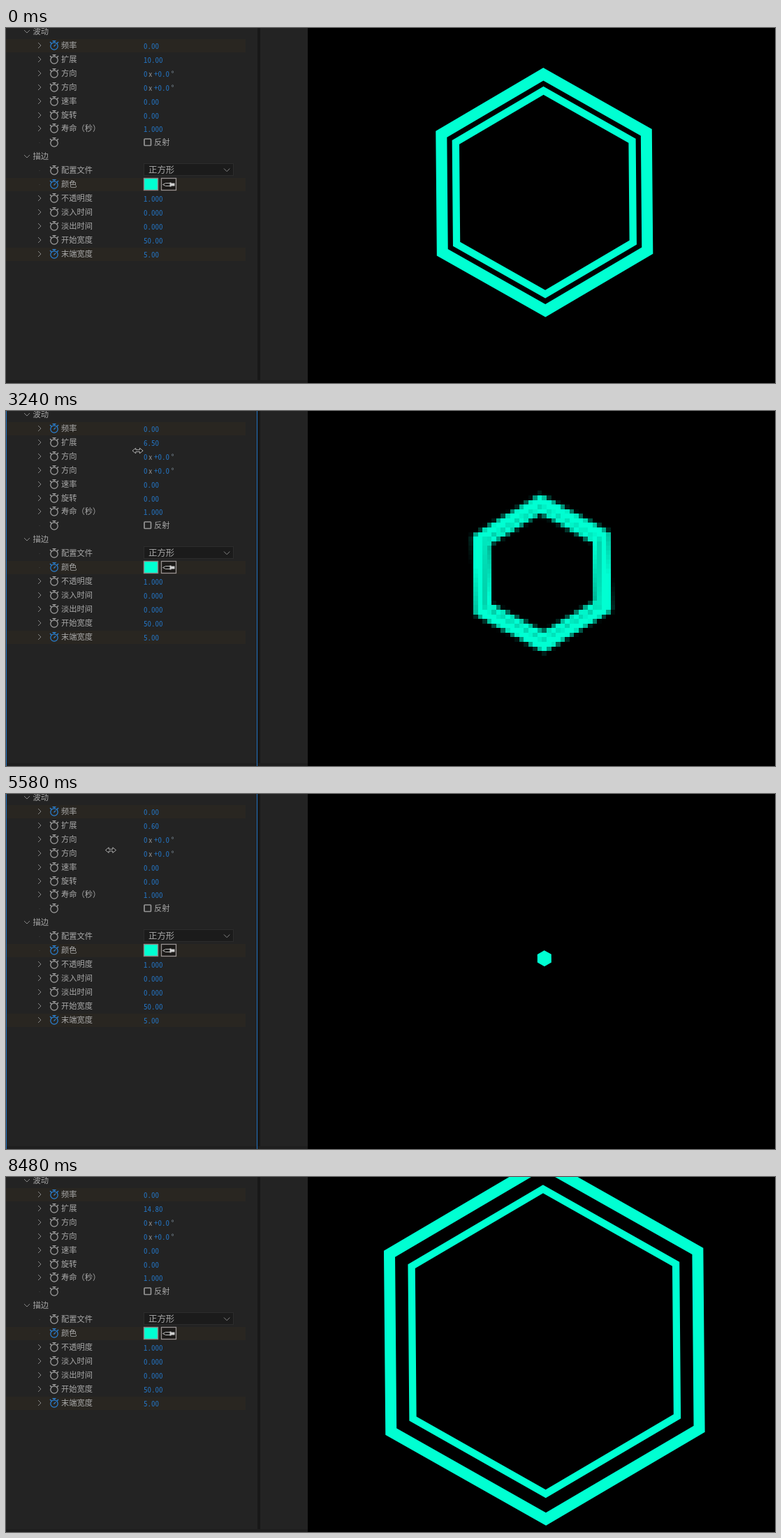
Animation, 1101 px wide and 509 px high, one loop 8510 ms. Source, as an HTML page with a canvas:

```html
<!DOCTYPE html>
<html lang="zh">
<head>
<meta charset="utf-8">
<style>
html, body { margin: 0; width: 100%; height: 100%; overflow: hidden; background: #232323; }
canvas, svg { position: absolute; left: 0; top: 0; width: 1101px; height: 509px; }
text { font: 300 11.25px "Noto Sans CJK SC", "Noto Sans CJK", "Noto Sans CJK JP", sans-serif; fill: #a8a8a8; }
text.num { font: 11px "Noto Sans Mono CJK SC", "Noto Sans Mono CJK JP", "Liberation Mono", monospace; fill: #2475c4; white-space: pre; }
.line { fill: none; stroke: #858585; stroke-width: 1; }
.watch { fill: none; stroke: #a6a6a6; stroke-width: 1.200; }
.watch.on { stroke: #2a84da; }
</style>
</head>
<body>
<canvas id="view" width="1101" height="509"></canvas>
<svg viewBox="0 0 1101 509">
  <rect width="360" height="509" fill="#232323"/>
  <rect x="360" width="4" height="509" fill="#181818"/>
  <rect x="364" width="68" height="509" fill="#232323"/>
  <rect y="505" width="432" height="4" fill="#1e1e1e"/>
  <g id="panel"></g>
  <path id="focus" d="M.5 0V509M359.500 0V509" stroke="#2272c0" fill="none"/>
  <path id="arrow" d="M0 0V16L3.700 12.600L6.200 18.300L8.700 17.200L6.200 11.700H11.300Z" fill="#fff" stroke="#000" stroke-width=".8"/>
  <g id="hand">
    <path d="M-1.500 0Q0 -1.500 1.500 0V6L7 7.500Q8.500 8 8 11L6.500 17H-2.500L-6.500 10.500Q-5.500 8 -1.500 11Z" fill="#fff" stroke="#000" stroke-width=".9"/>
    <path d="M-5 2L-9 5L-5 8M5 1L9 4L6.500 6" fill="none" stroke="#ddd"/>
  </g>
  <path id="drag" d="M-7.500 0L-2.800 -3.800V-1.300H2.800V-3.800L7.500 0L2.800 3.800V1.300H-2.800V3.800Z" fill="#161616" stroke="#c4c4c4" stroke-width=".9"/>
</svg>
<script>
const LOOP = 8510, TEAL = '#00ffd2';
const $ = id => document.getElementById(id);

// Panel rows: label, value, kind
const rows = [
  ['波动', '', 'group'], ['频率', '0.00', 'keyed'], ['扩展', '10.00', 'live'],
  ['方向', 'angle'], ['方向', 'angle'], ['速率', '0.00'], ['旋转', '0.00'],
  ['寿命（秒）', '1.000'], ['', '', 'check'], ['描边', '', 'group'],
  ['配置文件', '', 'menu'], ['颜色', '', 'color'], ['不透明度', '1.000'],
  ['淡入时间', '0.000'], ['淡出时间', '0.000'], ['开始宽度', '50.00'], ['末端宽度', '5.00', 'keyed']
];

const label = (x, y, s, extra = '') => `<text x="${x}" y="${y}" ${extra}>${s}</text>`;
const num = (x, y, s, extra = '') => label(x, y, s, 'class="num" ' + extra);
const line = d => `<path class="line" d="${d}"/>`;

function stopwatch(y, on) {
  return `<path class="watch ${on ? 'on' : ''}" d="M74.200 ${y + 1}a5.200 5.200 0 1 1 -10.400 0a5.200 5.200 0 1 1 10.400 0` +
    `M66.500 ${y - 6.3}h5M69 ${y - 6}v2M63 ${y - 5}l2 2M75 ${y - 5}l-2 2${on ? `M68.500 ${y + 1.5}l2.700 -2.800` : ''}"/>`;
}

function control(kind, value, y) {
  if (kind === 'check')
    return `<rect x="198" y="${y - 5}" width="9.500" height="9.500" rx="1" fill="none" stroke="#959595" stroke-width="1.700"/>` + label(212, y + 4, '反射');
  if (kind === 'menu')
    return `<rect x="197.500" y="${y - 9.5}" width="128" height="17" fill="#1b1b1b" stroke="#2c2c2c"/>` +
      label(204, y + 4, '正方形', 'style="font-size:12.400px"') + line(`M312 ${y - 2.5}l4.200 4.200l4.200 -4.200`);
  if (kind === 'color')
    return `<rect x="197.500" y="${y - 8.5}" width="20" height="17" fill="${TEAL}" stroke="#908585" stroke-width="1.400"/>` +
      `<rect x="222.500" y="${y - 8.5}" width="21" height="17" fill="#1c1a18" stroke="#989292" stroke-width="1.300"/>` +
      `<path d="M224.500 ${y + .5}l4 -2h7v4h-7z" fill="none" stroke="#b8b8b8"/>` +
      `<path d="M234.500 ${y - 2.5}h2v1h5v4h-5v1h-2z" fill="#d0d0d0"/>`;
  if (value === 'angle')
    return num(197, y + 4.5, '0') + num(204, y + 4.5, 'x', 'style="fill:#8c8c8c"') + num(212, y + 4.5, '+0.0') + num(236.5, y + 4.5, '°', 'style="fill:#8494a2"');
  return value ? num(197, y + 4.5, value, kind === 'live' ? 'id="value"' : '') : '';
}

$('panel').innerHTML = rows.map(([name, value, kind], i) => {
  const y = Math.round(5 + 19.92 * i);
  if (kind === 'group')
    return line(`M26 ${y - 2}l4 4l4 -4`) + label(38.5, y + 4, name);
  const on = kind === 'keyed' || kind === 'color';
  const leaf = kind === 'check' || kind === 'menu' || kind === 'color';
  return (on ? `<rect y="${y - 9}" width="343" height="19" fill="#292621"/>` : '') +
    (leaf ? `<rect x="47.500" y="${y}" width="1" height="1" fill="#444"/>` : line(`M46 ${y - 4}l4 4l-4 4`)) +
    stopwatch(y, on) + label(79, y + 4, name) + control(kind, value, y);
}).join('');

// Drag path: time, cursor x, cursor y, value
const keys = [
  [1100, 210, 48, 10], [1140, 209, 48, 9.9], [1500, 183, 47, 7.5], [1930, 139, 45.5, 3.5],
  [2150, 126.5, 45, 2.3], [2400, 113, 46, 0.9], [2830, 140, 51, 2.6], [3240, 188.5, 57, 6.5],
  [3670, 228, 62, 10.2], [4120, 267, 66, 13.6], [4260, 280, 67, 14.7], [4450, 280, 67, 14.7],
  [5250, 163, 78, 2.7], [5450, 152, 80, 0.8], [5560, 150, 80.5, 0.6], [5730, 150, 80.5, 0.6],
  [6120, 203, 80, 5.6], [6530, 260, 79, 10.73], [6550, 263, 78.5, 11.2], [6850, 286, 79, 13.6],
  [7220, 297, 80, 14.8], [8510, 297, 80, 14.8]
];

const slope = (a, b, k) => (b[k] - a[k]) / (b[0] - a[0]);
function tangent(i, k) {
  if (!i || i === keys.length - 1) return 0;
  const a = slope(keys[i - 1], keys[i], k), b = slope(keys[i], keys[i + 1], k);
  return a * b <= 0 ? 0 : 2 * a * b / (a + b);
}
function track(t, k) {
  if (t <= keys[0][0]) return keys[0][k];
  let i = 0;
  while (i < keys.length - 2 && t > keys[i + 1][0]) i++;
  const a = keys[i], b = keys[i + 1], d = b[0] - a[0], u = Math.min(1, (t - a[0]) / d);
  const s = u * u * (3 - 2 * u);
  return a[k] + (b[k] - a[k]) * s + d * u * (1 - u) * ((1 - u) * tangent(i, k) - u * tangent(i + 1, k));
}

const ctx = $('view').getContext('2d');
const low = document.createElement('canvas'), lctx = low.getContext('2d');

function hexagon(c, half, tilt) {
  const r = half / Math.cos(Math.PI / 6);
  for (let i = 0; i < 6; i++) {
    const a = (i * 60 - 90 + tilt) * Math.PI / 180;
    c[i ? 'lineTo' : 'moveTo'](770.8 + r * Math.cos(a), 235.7 + r * Math.sin(a));
  }
  c.closePath();
}
function ring(c, half, width, tilt) {
  c.beginPath();
  hexagon(c, half, tilt);
  if (half > width) hexagon(c, half - width, tilt);
  c.fill('evenodd');
}
function rings(c, v, tilt) {
  c.fillStyle = TEAL;
  ring(c, 0.76 + 15.4 * v, 16, tilt);
  ring(c, 0.5 + 13.1 * v, 10.3, tilt);
}

// Preview block size while scrubbing, 0 for full quality
function blockSize(t) {
  if (t >= 2830 && t < 3710) return 6.56;
  return t >= 1140 && t < 4300 || t >= 4450 && t < 5500 ? 4.1 : 0;
}
function drawView(t) {
  const v = track(t - 20, 3), p = blockSize(t);
  ctx.fillStyle = '#000';
  ctx.fillRect(0, 0, 1101, 509);
  if (!p) return rings(ctx, v, -0.5);
  const [ox, oy] = p > 5 ? [426.3, -3.6] : [429.6, -2.8];
  low.width = Math.ceil(680 / p);
  low.height = Math.ceil(516 / p);
  // The coarse preview sits half a block up and to the left
  lctx.setTransform(1 / p, 0, 0, 1 / p, -ox / p - 0.5, -oy / p - 0.5);
  rings(lctx, v, -1.4);
  ctx.imageSmoothingEnabled = false;
  ctx.drawImage(low, ox, oy, low.width * p, low.height * p);
}

function place(id, shown, x, y) {
  $(id).setAttribute('display', shown ? 'inline' : 'none');
  $(id).setAttribute('transform', `translate(${x.toFixed(2)} ${y.toFixed(2)})`);
}
function draw(t) {
  drawView(t);
  $('value').textContent = track(t, 3).toFixed(1) + '0';
  $('focus').setAttribute('display', t >= 1140 && t < 8480 ? 'inline' : 'none');
  const u = Math.min(1, Math.max(0, (t - 80) / 670)), e = u * u * (3 - 2 * u);
  const x = 560 - 350 * e, y = 428 - 383 * e;
  const over = u > 0.93;
  place('arrow', t >= 80 && !over, x, y);
  place('hand', over && t < 990, x, y);
  place('drag', t >= 990 && t < 8480, track(t, 1), track(t, 2));
}

const start = performance.now();
function tick() {
  draw((performance.now() - start) % LOOP);
  requestAnimationFrame(tick);
}
tick();
</script>
</body>
</html>
```
